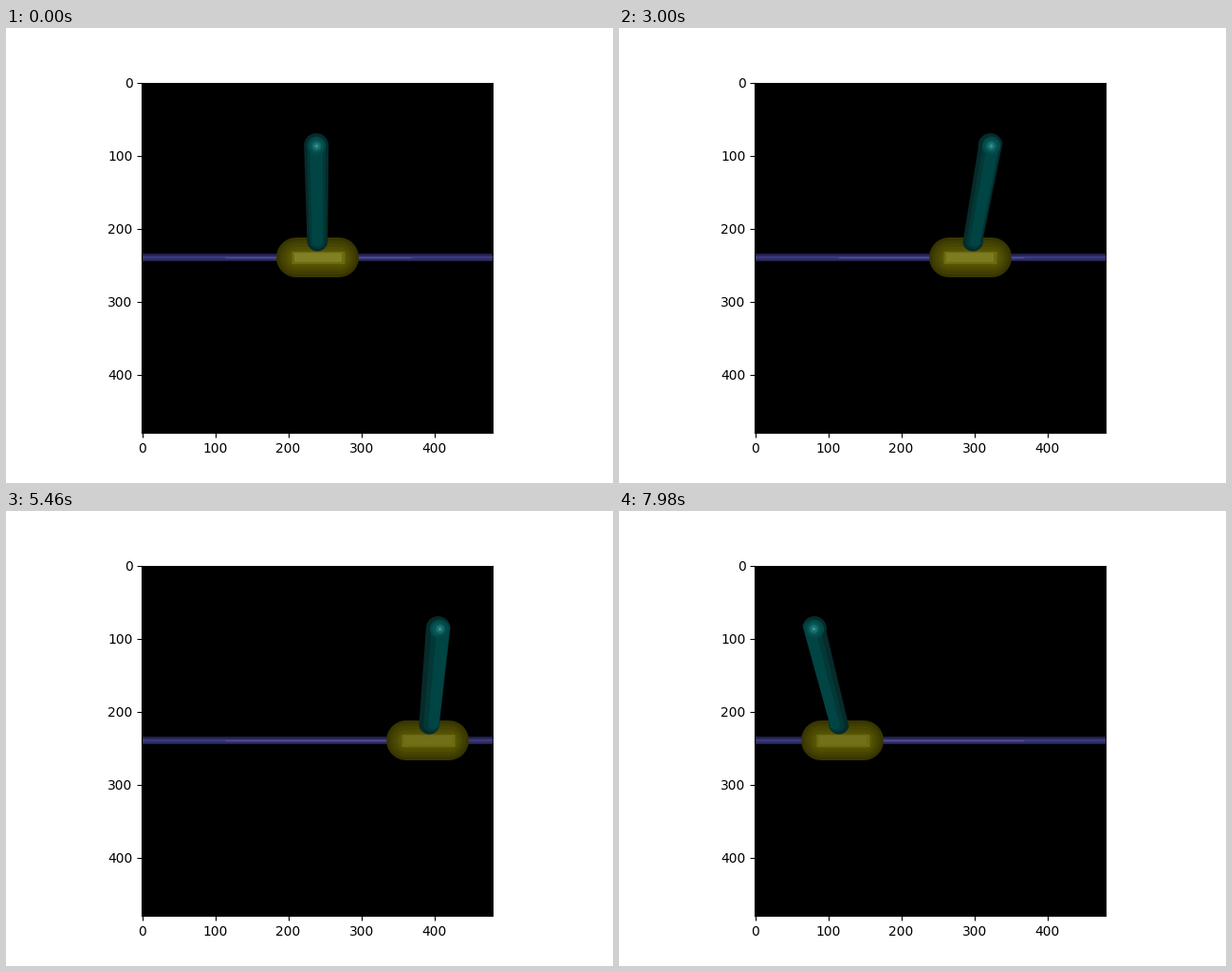
Animation, 640 px wide and 480 px high, one loop 8 s. Source, as a matplotlib script:

```python
import numpy as np
import matplotlib.pyplot as plt
from matplotlib.animation import FuncAnimation
from matplotlib.patches import Polygon

TICK, STEP, LOOP = 20, 60, 8000      # ms
MID_X, RAIL_Y = 328.0, 242.0         # optical centre of the view, px
TIP_Y, BASE_Y = 124.0, 224.7
TIP_R, BASE_R = 13.0, 10.9
HALF = 22.4                          # half length of the cart's axis

# key points (seconds, x in px): turning points of the cart and the pole tip
CART = [(0, 328.5), (0.75, 317.5), (1.68, 362), (1.98, 382), (2.4, 355.6),
        (3.0, 370.3), (3.32, 404.4), (3.54, 395.6), (4.02, 424.4),
        (4.32, 415.6), (5.42, 445), (6.36, 386.5), (7.56, 257), (7.98, 235.8)]
TIP = [(0, 327.2), (0.75, 327), (1.68, 364), (3.0, 391.6), (3.78, 426.6),
       (4.95, 464), (5.46, 455.7), (6.36, 396), (7.98, 206)]


def smooth_path(keys):
    """Cubic path through the keys that never overshoots them."""
    t, x = np.array(keys, float).T
    h = np.diff(t)
    d = np.diff(x) / h
    m = np.zeros_like(x)
    for i in range(1, len(x) - 1):
        if d[i - 1] * d[i] > 0:
            a, b = 2 * h[i] + h[i - 1], h[i] + 2 * h[i - 1]
            m[i] = (a + b) / (a / d[i - 1] + b / d[i])
    m[-1] = d[-1]

    def at(s):
        i = int(np.clip(np.searchsorted(t, s, side="right") - 1, 0, len(h) - 1))
        u = (s - t[i]) / h[i]
        return ((1 + 2 * u) * (1 - u) ** 2 * x[i] + u * (1 - u) ** 2 * h[i] * m[i]
                + u * u * (3 - 2 * u) * x[i + 1] + u * u * (u - 1) * h[i] * m[i + 1])
    return at


def mix(a, b, u):
    """Colour between two 0-255 triples."""
    return tuple((np.array(a) + (np.array(b) - a) * u) / 255)


cart_at, tip_at = smooth_path(CART), smooth_path(TIP)

fig, ax = plt.subplots(figsize=(6.4, 4.8), dpi=100)
ax.imshow(np.zeros((2, 2)), cmap="gray", interpolation="nearest",
          extent=(-0.5, 479.5, 479.5, -0.5))

stage = fig.add_axes([0, 0, 1, 1])
stage.set_xlim(0, 640)
stage.set_ylim(480, 0)
stage.axis("off")


def bar(x0, x1, width, color, cap="butt", y=RAIL_Y):
    line, = stage.plot([x0, x1], [y, y], color=color, lw=width * 0.72,
                       solid_capstyle=cap)
    return line


# rail, lighter towards its axis, with a highlight on the middle part
for i in range(3):
    bar(144, 512.6, 8 - 2.8 * i, mix((32, 31, 74), (58, 56, 124), i / 2))
bar(231, 427, 1.3, mix((84, 80, 158), (0, 0, 0), 0), y=RAIL_Y - 0.3)

cart_bands = [bar(0, 0, 42 - 6.2 * i, mix((56, 54, 0), (88, 86, 4), i / 4), "round")
              for i in range(5)]
core_edge = bar(0, 0, 13, mix((108, 106, 18), (0, 0, 0), 0))
core = bar(0, 0, 9.5, "k")

pole_bands = []
for i in range(3):
    color = mix((6, 43, 42), (0, 69, 68), i / 2)
    patch = stage.add_patch(Polygon([(0, 0)] * 3, fc=color, lw=0, zorder=3))
    pole_bands.append((1 - 0.24 * i, patch))

# rings of light on the rounded top of the pole
cap_rings = [stage.plot([0], [0], "o", ms=(9.6 - 2.6 * i) * 1.44, mec="none", zorder=4,
                        color=mix((0, 74, 73), (52, 146, 144), (i / 3) ** 1.7))[0]
             for i in range(4)]

ARC = np.linspace(0, np.pi, 24)


def pole_outline(tip, base, share, off):
    """Tapered bar with round ends, pushed towards its lit side."""
    turn = ARC + np.arctan2(tip - base, BASE_Y - TIP_Y)

    def end(x, y, r, side):
        x += 0.85 * off * r * (1 - share)
        return np.c_[x + side * r * share * np.cos(turn),
                     y - side * r * share * np.sin(turn)]
    return np.vstack([end(tip, TIP_Y, TIP_R, 1), end(base, BASE_Y, BASE_R, -1)])


def draw(frame):
    s = frame * TICK // STEP * STEP / 1000
    x, tip = cart_at(s), tip_at(s)
    base = x + 0.13 * (tip - x)
    off = np.clip((tip - MID_X) / 125, -1, 1)

    for line in cart_bands:
        line.set_xdata([x - HALF, x + HALF])
    core_edge.set_xdata([x - 28, x + 28])
    core.set_xdata([x - 25, x + 25])
    core.set_color(mix((130, 128, 36), (113, 111, 24), off ** 2))

    for share, patch in pole_bands:
        patch.set_xy(pole_outline(tip, base, share, off))
    for i, ring in enumerate(cap_rings):
        ring.set_data([tip + off * (i + 1) * 0.35], [TIP_Y - 0.5])
    return []


anim = FuncAnimation(fig, draw, frames=LOOP // TICK, interval=TICK,
                     init_func=lambda: draw(0), repeat=True, repeat_delay=0,
                     blit=False)
plt.show()
```
